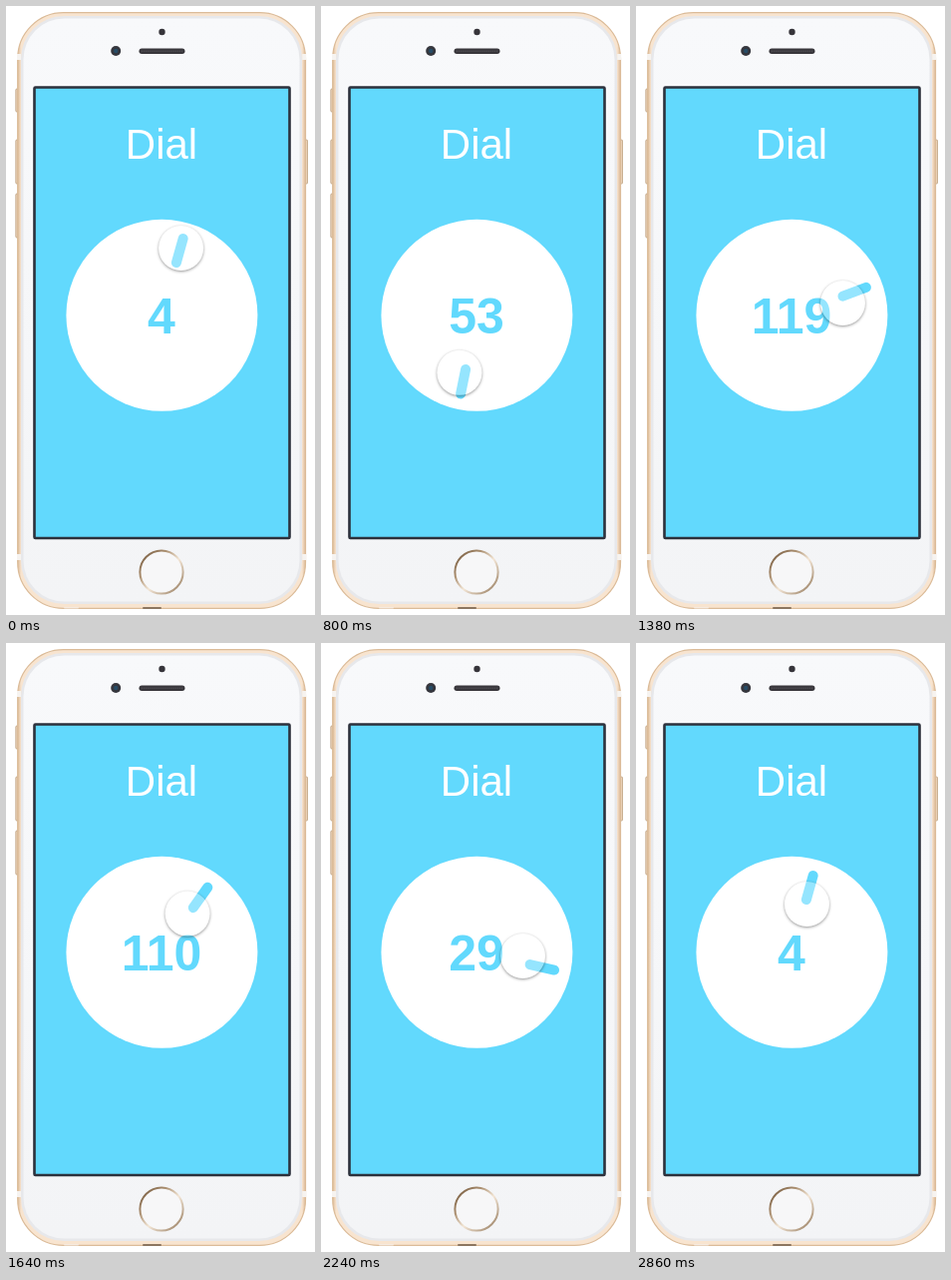
An HTML page that plays this animation: 310 px wide and 610 px high, repeating every 2880 ms.

```html
<!DOCTYPE html>
<html lang="en">
<head>
<meta charset="utf-8">
<title>Dial</title>
<style>
  html, body { margin: 0; width: 100%; height: 100%; overflow: hidden; background: #fff; }
  #stage { position: relative; width: 310px; height: 610px; overflow: hidden; }
  svg { position: absolute; left: 0; top: 0; }
  text { font-family: "Liberation Sans", Arial, sans-serif; text-anchor: middle; }
  #finger {
    position: absolute; left: -22.5px; top: -22.5px; width: 45px; height: 45px;
    border-radius: 50%; background: rgba(255, 255, 255, .32);
    box-shadow: 0 1px 3px rgba(0, 0, 0, .42);
  }
</style>
</head>
<body>
<div id="stage">
  <svg width="310" height="610" viewBox="0 0 310 610">
    <defs>
      <linearGradient id="gold" x1="0" y1="0" x2="1" y2="0">
        <stop offset="0" stop-color="#dcb995"/>
        <stop offset=".012" stop-color="#f8e4cf"/>
        <stop offset=".988" stop-color="#f8e4cf"/>
        <stop offset="1" stop-color="#dcb995"/>
      </linearGradient>
      <linearGradient id="glass" x1="0" y1="0" x2="0" y2="1">
        <stop offset="0" stop-color="#f8f9fb"/>
        <stop offset="1" stop-color="#f3f4f6"/>
      </linearGradient>
      <linearGradient id="ring" x1="0" y1="0" x2="1" y2="1">
        <stop offset="0" stop-color="#6b5035"/>
        <stop offset=".3" stop-color="#a98d6e"/>
        <stop offset=".55" stop-color="#f3e6d6"/>
        <stop offset="1" stop-color="#8d7152"/>
      </linearGradient>
    </defs>

    <!-- side buttons -->
    <g fill="#ead2b8" stroke="#b79874" stroke-width=".7">
      <rect x="9.8" y="83" width="3" height="23" rx="1"/>
      <rect x="9.8" y="134" width="3" height="44" rx="1"/>
      <rect x="9.8" y="188" width="3" height="44" rx="1"/>
      <rect x="299.5" y="134" width="3" height="44" rx="1"/>
    </g>

    <!-- body -->
    <rect x="11.7" y="6.7" width="288.8" height="596.6" rx="46" fill="url(#gold)" stroke="#dbbb98" stroke-width="1.2"/>
    <g fill="#f6f3f0">
      <rect x="11" y="48" width="4" height="6"/>
      <rect x="297.2" y="48" width="4" height="6"/>
      <rect x="11" y="549" width="4" height="6"/>
      <rect x="297.2" y="549" width="4" height="6"/>
    </g>
    <rect x="15" y="10" width="282" height="589" rx="43" fill="#e7e8eb"/>
    <rect x="17.5" y="12.5" width="277" height="584" rx="41" fill="url(#glass)"/>
    <rect x="137" y="602" width="19" height="2" rx="1" fill="#8c7660"/>
    <rect x="58" y="602" width="15" height="1.6" rx=".8" fill="#f5eadf"/>

    <!-- sensors, speaker, home button -->
    <circle cx="156.5" cy="26" r="3.2" fill="#36343a"/>
    <circle cx="110.2" cy="45" r="5" fill="#35363d"/>
    <circle cx="110.2" cy="45" r="2.2" fill="#274c66"/>
    <rect x="133.5" y="42.5" width="46" height="5.4" rx="2.7" fill="#38363b"/>
    <path d="M136 45.2H177" stroke="#625f64" stroke-dasharray="1 1"/>
    <circle cx="156" cy="567" r="21.6" fill="#f7f7f8" stroke="url(#ring)" stroke-width="2"/>

    <!-- screen -->
    <rect x="28.5" y="81.5" width="256" height="451.5" rx="1" fill="#62d9fd" stroke="#2b303b" stroke-width="2.6"/>
    <text x="156" y="152.5" font-size="42" fill="#fff">Dial</text>
    <circle cx="156.4" cy="309.8" r="96" fill="#fff"/>
    <g fill="#62d9fd">
      <text id="count" x="156" y="328" font-size="50" font-weight="700">4</text>
      <path id="mark" d="M156 255V230" stroke="#62d9fd" stroke-width="10" stroke-linecap="round"/>
    </g>
  </svg>
  <div id="finger"></div>
</div>
<script>
  const LOOP = 2880, STEP = 20, CX = 156, CY = 310;

  // time, dial angle, angular speed, finger lead, finger radius
  const keys = [
    [0, 15.7, 0, 0, 70.6],
    [520, 107, .25, 4, 61],
    [1080, 299.7, .42, 7.5, 58],
    [1380, 429.4, .36, 6.3, 52.6],
    [1460, 445, 0, 0, 50.5],
    [1880, 268.5, -.45, -5.5, 42.3],
    [2240, 102.7, -.41, -9, 46.1],
    [2860, 15.7, 0, 1.3, 51.2]
  ];
  const count = document.getElementById("count");
  const mark = document.getElementById("mark");
  const finger = document.getElementById("finger");

  const mix = (a, b, u) => a + (b - a) * u;

  function hermite(a, b, va, vb, span, u) {
    const w = 1 - u;
    return a * w * w * (1 + 2 * u) + b * u * u * (3 - 2 * u)
      + span * u * w * (va * w - vb * u);
  }

  function pose(t) {
    t = Math.min(t, 2860);
    const i = Math.max(1, keys.findIndex(k => k[0] >= t));
    const a = keys[i - 1], b = keys[i], span = b[0] - a[0];
    const u = (t - a[0]) / span;
    return {
      angle: hermite(a[1], b[1], a[2], b[2], span, u),
      lead: mix(a[3], b[3], u),
      radius: mix(a[4], b[4], u)
    };
  }

  function draw(t) {
    const { angle, lead, radius } = pose(t);
    const rad = (angle + lead) * Math.PI / 180;
    const x = CX + radius * Math.sin(rad), y = CY - radius * Math.cos(rad);
    count.textContent = Math.round(angle / 3.6);
    mark.setAttribute("transform", `rotate(${angle} ${CX} ${CY})`);
    finger.style.transform = `translate(${x}px, ${y}px)`;
  }

  const start = performance.now();
  function tick() {
    const t = (performance.now() - start) % LOOP;
    draw(Math.floor(t / STEP) * STEP);
    requestAnimationFrame(tick);
  }
  tick();
</script>
</body>
</html>
```
